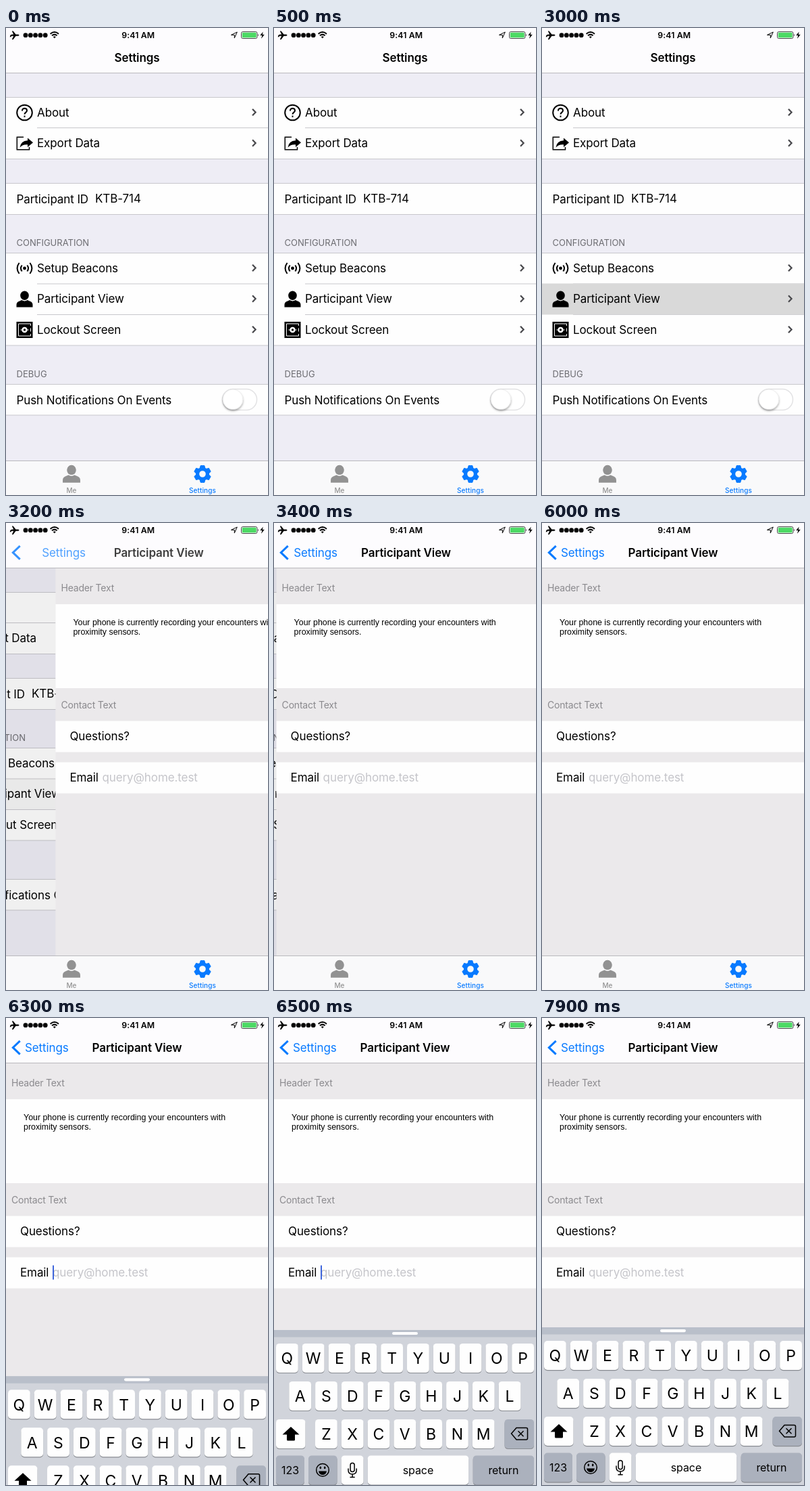
An HTML page that plays this animation: 388 px wide and 690 px high, repeating every 8 s.

```html
<!DOCTYPE html>
<html lang="en">
<head>
<meta charset="utf-8">
<title>Settings</title>
<style>
html, body { margin: 0; width: 100%; height: 100%; overflow: hidden; background: #fff; }
svg { display: block; width: 100vw; height: 100vh; }
text { font: 17px Inter, Roboto, sans-serif; letter-spacing: -.1px; }
.bold { font-weight: 600; }
.mid { text-anchor: middle; }
.group { font-size: 13px; letter-spacing: 0; fill: #6d6d72; }
.label { font-size: 14px; letter-spacing: -.2px; fill: #8b8a8e; }
.note { font: 12.4px "Liberation Sans", Arial, sans-serif; letter-spacing: 0; }
.time { font-size: 12.3px; font-weight: 600; letter-spacing: .1px; }
.tab { font-size: 10px; font-weight: 500; letter-spacing: .1px; }
.key { font-size: 23px; letter-spacing: 0; }
.word { font-size: 16px; }
.line { fill: none; stroke: #000; stroke-width: 2; }
.thin { stroke-width: 1.5; }
.hair { stroke: #c8c7cc; stroke-width: 1; }
.blue { fill: #087aff; }
</style>
</head>
<body>
<svg viewBox="0 0 388 690">
  <defs>
    <g id="person">
      <ellipse cy="-5.3" rx="6.3" ry="6.7"/>
      <path d="M-12 12V8.5Q-12 4.5-8 3.2L-4.2 1.6Q0 4.2 4.2 1.6L8 3.2Q12 4.5 12 8.5V12Z"/>
    </g>
    <filter id="soft" x="-30%" y="-30%" width="160%" height="170%">
      <feDropShadow dx="0" dy="2" stdDeviation="1.8" flood-opacity=".36"/>
    </filter>
  </defs>

  <g id="list">
    <path fill="#eeedf5" d="M0 66H388V690H0Z"/>
    <g id="cells"></g>
    <rect id="pressed" y="377.5" width="388" height="46" fill="#d9d9d9"/>
    <g id="chevrons" class="line" style="stroke:#48484c;stroke-width:2.2"></g>

    <circle class="line" cx="27.5" cy="125" r="11.3"/>
    <path class="line" d="M24 122.4Q24 118.8 27.5 118.8T31 122.2C31 124.5 27.5 124.8 27.5 127.6M27.5 129.6V131.8"/>
    <path class="line thin" d="M26 161.3H16.3V179.7H34.5V176"/>
    <path d="M32 162.5L40 169.3L32 176V172.3Q25 171.5 20.5 176.5Q22 166.5 32 166.2Z"/>
    <circle cx="27.5" cy="355" r="2.4"/>
    <path class="line" d="M23.7 350.5Q20.2 355 23.7 359.5M31.3 350.5Q34.8 355 31.3 359.5M19.6 347Q13.6 355 19.6 363M35.4 347Q41.4 355 35.4 363"/>
    <use href="#person" x="27.5" y="400.5"/>
    <rect x="15.5" y="434" width="24" height="24"/>
    <g fill="none" stroke="#fff">
      <path d="M36.5 440V437H18.5V455H36.5V452M36.5 443.5V448.5"/>
      <circle cx="27.5" cy="446" r="3" stroke-width="2.6"/>
      <path d="M21.5 446H23.5M31.5 446H33.5"/>
    </g>

    <text x="46" y="130.7">About</text>
    <text x="46" y="176">Export Data</text>
    <text x="15.5" y="258.5">Participant ID</text>
    <text x="132" y="258">KTB-714</text>
    <text class="group" x="15.5" y="322">CONFIGURATION</text>
    <text x="46" y="361">Setup Beacons</text>
    <text x="46" y="406">Participant View</text>
    <text x="46" y="452">Lockout Screen</text>
    <text class="group" x="15.5" y="516">DEBUG</text>
    <text x="15.5" y="555.5">Push Notifications On Events</text>
    <rect x="320.5" y="533.5" width="51" height="31" rx="15.5" fill="#fff" stroke="#e2e2e4" stroke-width="1.5"/>
    <circle cx="336" cy="548.7" r="14.8" fill="#fff" stroke="#ddd" stroke-width=".5" filter="url(#soft)"/>
    <rect id="dim" y="66" width="388" height="624"/>
  </g>

  <g id="detail">
    <path fill="#ebe9eb" d="M0 66H388V690H0Z"/>
    <path fill="#fefefe" d="M0 120H388V244H0ZM0 292.5H388V338.5H0ZM0 353.5H388V399.5H0Z"/>
    <text class="label" x="8" y="101">Header Text</text>
    <text class="note" x="26" y="150.5">Your phone is currently recording your encounters with</text>
    <text class="note" x="26" y="164.7">proximity sensors.</text>
    <text class="label" x="8" y="273.5">Contact Text</text>
    <text x="21" y="321">Questions?</text>
    <text x="21" y="382">Email</text>
    <text x="69" y="382" fill="#c5c5ca">query@home.test</text>
    <rect id="caret" x="69" y="365.5" width="2" height="21" fill="#3f66dc"/>
  </g>

  <path fill="#fdfcfe" d="M0 0H388V66.5H0Z"/>
  <path class="hair" d="M0 66.5H388" style="stroke:#b9b9bd"/>
  <text id="listTitle" class="bold mid" x="194" y="50">Settings</text>
  <text id="detailTitle" class="bold mid" x="194" y="50">Participant View</text>
  <text id="backLabel" class="blue" x="28" y="50">Settings</text>
  <path id="backArrow" class="line" d="M20.7 33.8L10.3 43.7L20.7 53.6" style="stroke:#087aff;stroke-width:3"/>

  <path d="M5.5 10.5L7 10.5L8.5 9.6H11.2L8.8 4.5H10.6L14.6 9.6H17.5Q19.5 9.7 19.5 10.7T17.5 11.8H14.6L10.6 17H8.8L11.2 11.8H8.5L7 13.2H5.7L6.5 10.7Z"/>
  <g id="signal"></g>
  <path class="line" d="M65.6 8.7Q71.8 3.2 78 8.7M68 11.3Q71.8 8 75.6 11.3"/>
  <path d="M69.7 13Q71.8 11.5 73.9 13L71.8 15.3Z"/>
  <text class="time mid" x="195.7" y="15">9:41 AM</text>
  <path class="line" d="M333.5 10.3L342.3 6L338.3 14.8V10.3Z" style="stroke-width:1"/>
  <rect x="348.5" y="5.5" width="23.5" height="10" rx="2.2" fill="none" stroke="#333" stroke-width=".9"/>
  <rect x="349.8" y="6.8" width="20.9" height="7.4" rx="1" fill="#4cd964"/>
  <path d="M373 8.8Q374.6 10.5 373 12.2Z"/>
  <path d="M380.6 5.5L376.3 11H379.2L378 15.8L382.7 9.7H379.7Z"/>

  <path fill="#f9f9fa" d="M0 639H388V690H0Z"/>
  <path class="hair" d="M0 639.5H388" style="stroke:#b9b9bd"/>
  <use href="#person" transform="translate(97 658.8)scale(1.08)" fill="#929292"/>
  <text class="tab mid" x="97" y="686.5" fill="#929292">Me</text>
  <g id="gear" class="blue" transform="translate(291 659)" stroke="#087aff" stroke-linejoin="round">
    <circle r="7.4" fill="none" stroke-width="5.2"/>
  </g>
  <text class="tab mid blue" x="291" y="686.5">Settings</text>

  <g id="keyboard">
    <path fill="#d1d4db" d="M0 457H388V700H0Z"/>
    <path fill="#b9bfca" d="M0 457H388V467.5H0Z"/>
    <rect x="175" y="460" width="38" height="4.2" rx="2.1" fill="#fff"/>
    <g id="keys"></g>
    <path d="M25 600L37.5 611.5H31V619Q31 620.5 29.5 620.5H20.5Q19 620.5 19 619V611.5H12.5Z"/>
    <path class="line thin" d="M359 601.5H373.5Q375.5 601.5 375.5 603.5V617Q375.5 619 373.5 619H359L351.5 610.2ZM361.5 606.3L369.5 614.3M369.5 606.3L361.5 614.3"/>
    <circle class="line thin" cx="72" cy="664" r="9.3"/>
    <path d="M66 665.5H78Q77 671 72 671T66 665.5Z"/>
    <ellipse cx="68.8" cy="660.5" rx="1.3" ry="1.9"/>
    <ellipse cx="75.2" cy="660.5" rx="1.3" ry="1.9"/>
    <rect class="line thin" x="113.1" y="653.7" width="6" height="13" rx="3"/>
    <path class="line thin" d="M110 661.5V664Q110 670 116.1 670T122.2 664V661.5M116.1 670V674.5M112.5 674.7H119.7"/>
  </g>
</svg>
<script>
const LOOP = 8000, PRESS = 2950, PUSH = 3033, FOCUS = 6170;
const $ = id => document.getElementById(id);
const add = (id, markup) => $(id).insertAdjacentHTML("beforeend", markup);

// Table cells: top, bottom, inner separators
[[102.5, 193.5, 147.5], [229.5, 275.5], [332.5, 469, 378, 423.5], [526.5, 572]].forEach(([top, end, ...seps]) => {
  add("cells", `<path fill="#fefefe" d="M0 ${top}H388V${end}H0Z"/>
    <path class="hair" d="M0 ${top}H388M0 ${end}H388${seps.map(y => `M46 ${y}H388`).join("")}"/>`);
});
for (const y of [124.5, 170, 354.5, 400, 445.5])
  add("chevrons", `<path d="M365 ${y - 4.8}L369.6 ${y}L365 ${y + 4.8}"/>`);
for (let i = 0; i < 5; i++) add("signal", `<circle cx="${29 + i * 7.3}" cy="10.7" r="3.4"/>`);
for (let i = 0; i < 6; i++)
  add("gear", `<path d="M-4 -8L-2.8 -12.4H2.8L4 -8Z" transform="rotate(${i * 60})"/>`);

function key(x, y, w, text = "", dark = false) {
  const kind = text.length > 1 ? "word" : "key", drop = text.length > 1 ? 27.5 : 30.3;
  const box = (top, fill) => `<rect x="${x}" y="${top}" width="${w}" height="43" rx="5" fill="${fill}"/>`;
  add("keys", box(y + 1.2, "#898c92") + box(y, dark ? "#abb1bd" : "#fefefe") +
    `<text class="${kind} mid" x="${x + w / 2}" y="${y + drop}">${text}</text>`);
}
[["QWERTYUIOP", 3, 477], ["ASDFGHJKL", 22.3, 533], ["ZXCVBNM", 61, 589]].forEach(([row, x, y]) =>
  [...row].forEach((c, i) => key(x + i * 38.8, y, 32.8, c)));
key(3, 589, 43.5);
key(341.5, 589, 43.5, "", true);
key(3, 642.5, 42, "123", true);
key(51, 642.5, 42.5, "", true);
key(99.7, 642.5, 32.8);
key(138.7, 642.5, 149.5, "space");
key(294.7, 642.5, 90.3, "return", true);

// Critically damped spring: 1 at the start, settling to 0
function settle(ms) {
  const s = Math.max(0, ms) * .01826;
  return (1 + s) * Math.exp(-s);
}
const clamp = v => Math.min(1, Math.max(0, v));
const shift = (id, x, y = 0) => $(id).setAttribute("transform", `translate(${x} ${y})`);
const fade = (id, v) => $(id).setAttribute("opacity", clamp(v));

function caretAlpha(t) {
  if (t < FOCUS) return 0;
  const p = (t - FOCUS - 30 + 1000) % 1000 / 1000;
  return p < .85 ? clamp((.6 - p) / .1) : (p - .85) / .15;
}

function draw(t) {
  const left = settle(t - PUSH), done = 1 - left;
  shift("list", -116 * done);
  shift("detail", 388 * left);
  fade("pressed", t < PRESS ? 0 : left);
  fade("dim", .07 * done);
  shift("listTitle", -134 * done);
  fade("listTitle", 1 - done * 1.6);
  shift("backLabel", 133 * left);
  fade("backLabel", done * 1.6 - .6);
  fade("backArrow", done);
  shift("detailTitle", 170 * left);
  fade("detailTitle", done * 1.3 - .3);
  shift("keyboard", 0, t < FOCUS ? 240 : 233 * settle(t - FOCUS));
  fade("caret", caretAlpha(t));
}

const start = performance.now();
function tick() {
  draw((performance.now() - start) % LOOP);
  requestAnimationFrame(tick);
}
tick();
</script>
</body>
</html>
```
